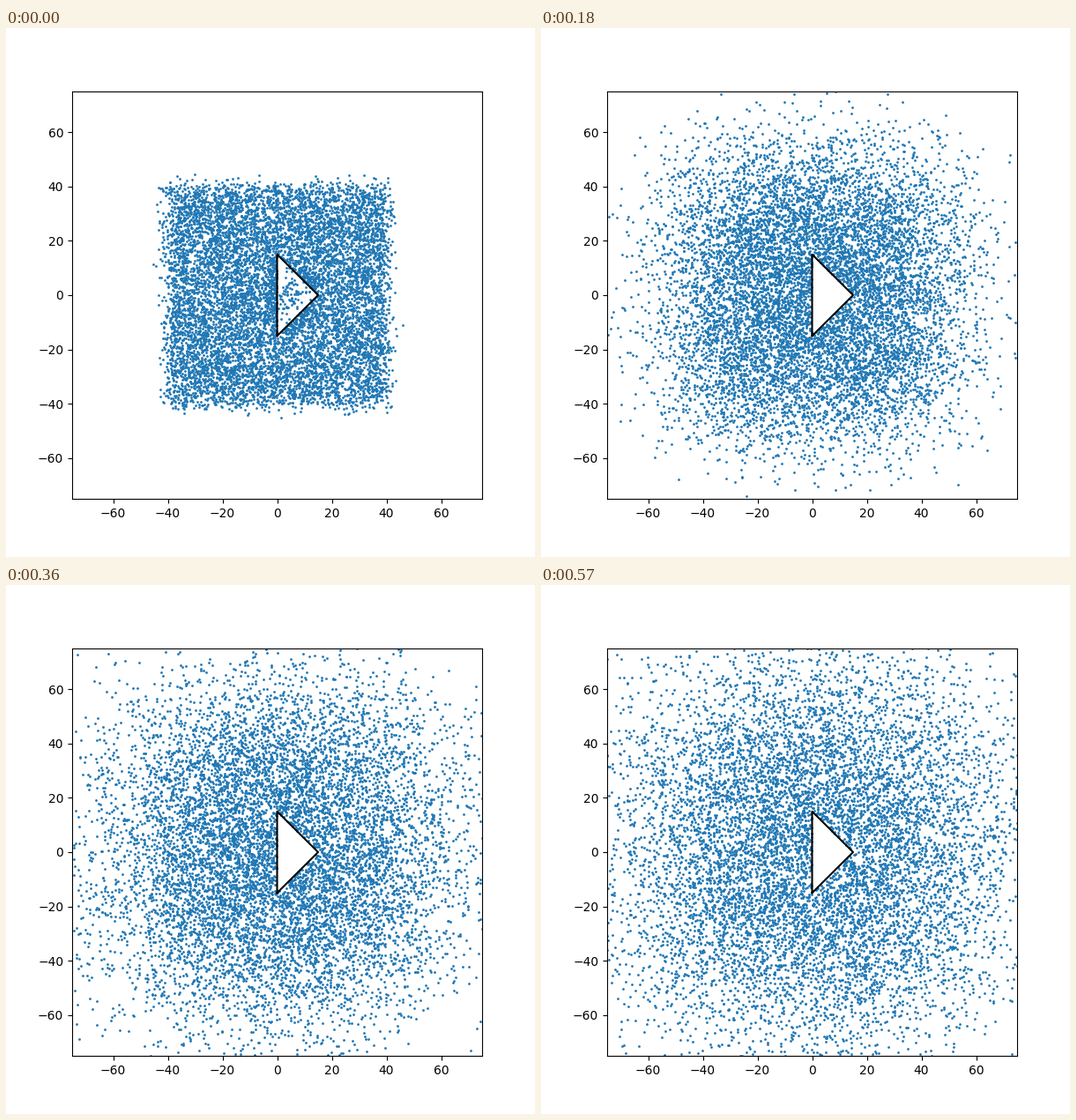
These frames come from a looping animation (600x600 px, 0.6 s). A matplotlib script:

```python
import numpy as np
import matplotlib.pyplot as plt
from matplotlib.animation import FuncAnimation

FRAMES, INTERVAL = 20, 30
COUNT, HALF, STEP = 10000, 40, 2.0
STEPS_PER_FRAME = 10
TIP = 15

rng = np.random.default_rng(7)


def depth(p):
    """Distance to the nearest wall, positive inside the triangle."""
    x, y = p
    return np.minimum(x, (TIP - x - np.abs(y)) / np.sqrt(2))


def expel(p):
    """Mirror most of the enclosed particles across their nearest wall."""
    d = depth(p)
    out = (d > 0) & (d * rng.random(COUNT) < 1.7)
    left = out & (d == p[0])
    slant = out & ~left
    shift = np.sqrt(2) * d[slant]
    p[0, left] *= -1
    p[0, slant] += shift
    p[1, slant] += shift * np.sign(p[1, slant])


def walk(p):
    """One diffusion step; the walls let particles out but not in."""
    new = p + rng.normal(0, STEP, p.shape)
    blocked = (depth(p) <= 0) & (depth(new) > 0)
    return np.where(blocked, p, new)


def simulate():
    p = rng.uniform(-HALF, HALF, (2, COUNT))
    expel(p)
    p = walk(p)
    states = [p]
    for _ in range(FRAMES - 1):
        for _ in range(STEPS_PER_FRAME):
            p = walk(p)
        states.append(p)
    return states


states = simulate()

fig, ax = plt.subplots(figsize=(6, 6), dpi=100)
ax.set_xlim(-75, 75)
ax.set_ylim(-75, 75)
dots, = ax.plot(*states[0], "o", ms=1, color="tab:blue")
ax.plot([0, 0, TIP, 0], [-TIP, TIP, 0, -TIP], color="black", lw=1.5)


def update(i):
    dots.set_data(*states[i])
    return dots,


anim = FuncAnimation(fig, update, frames=FRAMES, interval=INTERVAL,
                     repeat=True, repeat_delay=0)
plt.show()
```
